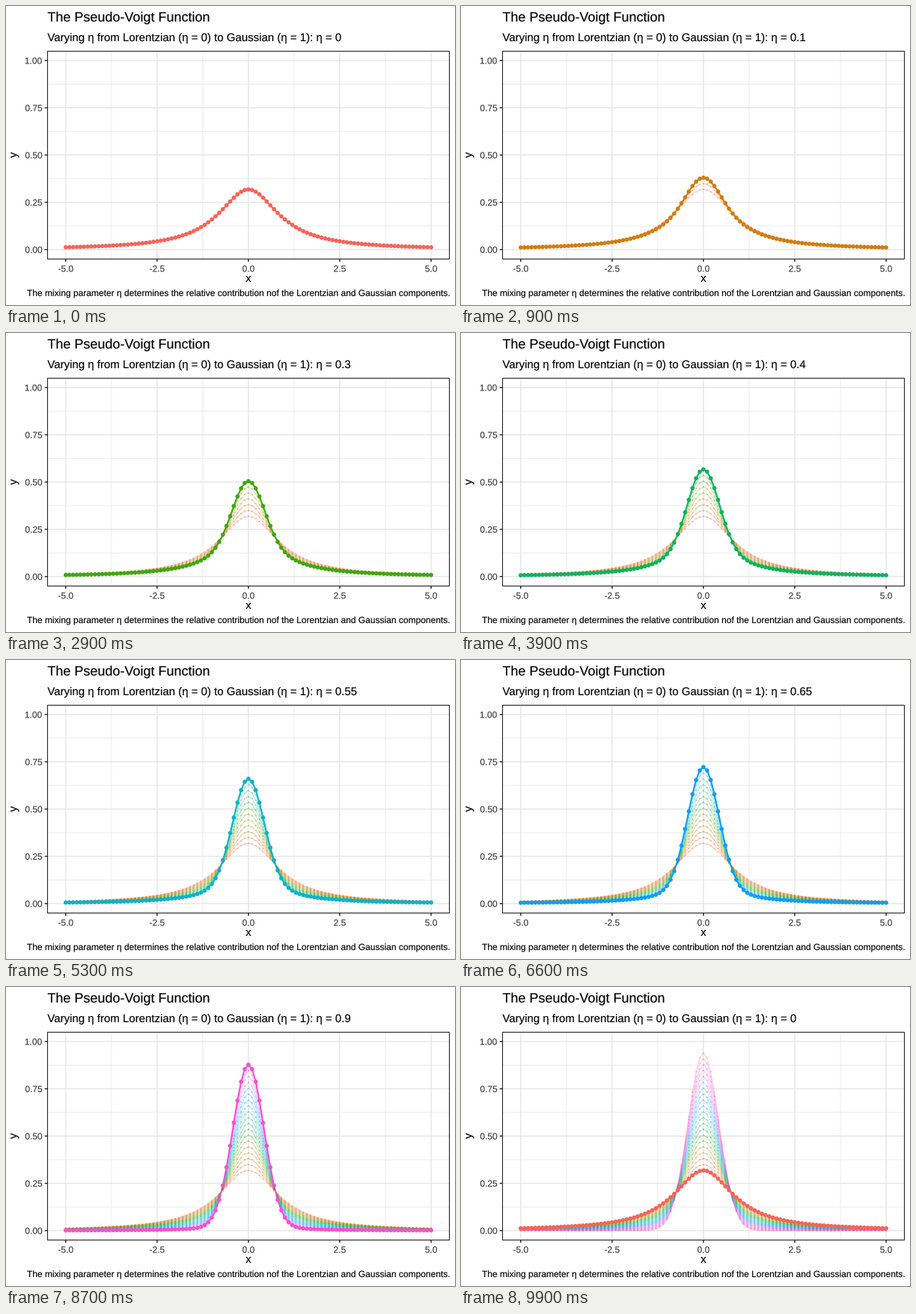
Write a matplotlib script that moves like this. It is 600x400 px and loops after 10000 ms.

```python
import numpy as np
import matplotlib.pyplot as plt
from matplotlib.animation import FuncAnimation
from matplotlib.patches import PathPatch, Rectangle
from matplotlib.textpath import TextPath
from matplotlib.transforms import Affine2D

plt.rcParams.update({"font.family": "Liberation Sans", "path.snap": False})

WIDTH, HEIGHT = 600, 400
LEFT, RIGHT, TOP, BOTTOM = 55.4, 592.5, 60.3, 338.5
FRAMES, INTERVAL = 100, 100
STATES = 21
RULE = 1.45  # width of theme lines in pixels
GAMMA = 1.22  # the colours are rendered slightly darker than nominal
# First frame of every state; the last entry is the return to the first curve.
STARTS = np.array([0, *range(4, 50, 5), *range(53, 84, 5), 87, 91, 95, 99])


def px(x):
    return LEFT + (np.asarray(x) + 5.5) / 11 * (RIGHT - LEFT)


def py(y):
    return BOTTOM - (np.asarray(y) + 0.05) / 1.1 * (BOTTOM - TOP)


def grey(level):
    return (level ** GAMMA,) * 3


def hue_color(hue, chroma=100, light=65):
    """CIE LUV polar colour converted to RGB."""
    h = np.radians(hue)
    u = chroma * np.cos(h) / (13 * light) + 0.19784
    v = chroma * np.sin(h) / (13 * light) + 0.46834
    Y = ((light + 16) / 116) ** 3
    X = 9 * Y * u / (4 * v)
    Z = Y * (12 - 3 * u - 20 * v) / (4 * v)
    to_rgb = np.array([[3.2405, -1.5371, -0.4985],
                       [-0.9693, 1.8760, 0.0416],
                       [0.0556, -0.2040, 1.0572]])
    linear = np.clip(to_rgb @ [X, Y, Z], 0, 1)
    rgb = np.where(linear > 0.00304,
                   1.055 * linear ** (1 / 2.4) - 0.055, 12.92 * linear)
    return tuple(np.clip(rgb, 0.1, 1) ** GAMMA)


def pseudo_voigt(x, eta):
    lorentz = 1 / (np.pi * (1 + x ** 2))
    gauss = 2 * np.sqrt(np.log(2) / np.pi) * np.exp(-4 * np.log(2) * x ** 2)
    return eta * gauss + (1 - eta) * lorentz


fig = plt.figure(figsize=(WIDTH / 72, HEIGHT / 72), dpi=72, facecolor="white")
ax = fig.add_axes([0, 0, 1, 1])
ax.set(xlim=(0, WIDTH), ylim=(HEIGHT, 0))
ax.axis("off")


def rule(x0, y0, x1, y1, color, width=RULE):
    ax.plot([x0, x1], [y0, y1], color=color, lw=width, zorder=1,
            solid_capstyle="butt")


def text_path(x, y, text, size, align=0, angle=0):
    """Outline of text on baseline y; align runs from 0 (left) to 1 (right)."""
    path = TextPath((0, 0), text, size=size)
    box = path.get_extents()
    shift = -align * (box.x0 + box.x1)
    place = Affine2D().translate(shift, 0).rotate_deg(angle)
    return place.scale(1, -1).translate(x, y).transform_path(path)


def label(*args, color="black", **kw):
    return ax.add_patch(PathPatch(text_path(*args, **kw), fc=color, ec=color,
                                  lw=0.15, zorder=7))


# Grid, ticks and tick labels
for x in (-3.75, -1.25, 1.25, 3.75):
    rule(px(x), TOP, px(x), BOTTOM, grey(0.92), RULE / 2)
for y in (0.125, 0.375, 0.625, 0.875):
    rule(LEFT, py(y), RIGHT, py(y), grey(0.92), RULE / 2)
for x in (-5, -2.5, 0, 2.5, 5):
    rule(px(x), TOP, px(x), BOTTOM, grey(0.92))
    rule(px(x), BOTTOM, px(x), BOTTOM + 3.75, grey(0.2))
    label(px(x), 355.5, f"{x:.1f}", 12, 0.5, color=grey(0.3))
for y in (0, 0.25, 0.5, 0.75, 1):
    rule(LEFT, py(y), RIGHT, py(y), grey(0.92))
    rule(LEFT - 3.75, py(y), LEFT, py(y), grey(0.2))
    label(48.7, py(y) + 4.4, f"{y:.2f}", 12, 1, color=grey(0.3))
ax.add_patch(Rectangle((55.5, 60.5), 537, 278, fill=False, ec=grey(0.2),
                       lw=1.1, zorder=6, joinstyle="miter"))


# Titles
def subtitle_path(eta):
    return text_path(LEFT, 47, "Varying η from Lorentzian (η = 0) to Gaussian "
                     f"(η = 1): η = {eta:g}", 15)


label(LEFT, 20.7, "The Pseudo-Voigt Function", 18)
subtitle = ax.add_patch(PathPatch(subtitle_path(0), color="black", lw=0.15))
label(px(0), 369, "x", 15, 0.5)
label(14.3, py(0.5), "y", 15, 0.5, angle=90)
label(592.8, 388, "The mixing parameter η determines the relative contribution "
      "nof the Lorentzian and Gaussian components.", 12, 1)

# Curves: faint trails of earlier states below the current one
x = np.linspace(-5, 5, 101)
etas = np.arange(STATES) / 20
curves = [np.column_stack([px(x), py(pseudo_voigt(x, eta))]) for eta in etas]
colors = [hue_color(15 + 360 * i / STATES) for i in range(STATES)]


def curve(i, width, diameter, alpha, lift):
    line, = ax.plot(*curves[i].T, color=colors[i], lw=width, alpha=alpha,
                    zorder=2 + lift)
    # One size per dot keeps their positions from snapping to whole pixels.
    dots = ax.scatter(*curves[i].T, s=np.full(len(x), diameter ** 2),
                      color=colors[i], linewidths=0, alpha=alpha,
                      zorder=4 + lift)
    return line, dots


trails = [curve(i, 1.07, 2.5, 0.3, 0) for i in range(STATES)]
line, dots = curve(0, 2.13, 5.7, 1, 1)


def update(frame):
    step = np.searchsorted(STARTS, frame, side="right") - 1
    state = step % STATES
    # A state joins its own trail three frames after it appears.
    shown = step + (frame - STARTS[step] >= 3)
    for i, trail in enumerate(trails):
        for artist in trail:
            artist.set_visible(i < shown)
    line.set_data(*curves[state].T)
    dots.set_offsets(curves[state])
    for artist in (line, dots):
        artist.set_color(colors[state])
    subtitle.set_path(subtitle_path(etas[state])) if hasattr(
        subtitle, "set_path") else None
    return line, dots, subtitle


anim = FuncAnimation(fig, update, frames=FRAMES, interval=INTERVAL,
                     repeat=True, repeat_delay=0, blit=False)
plt.show()
```
